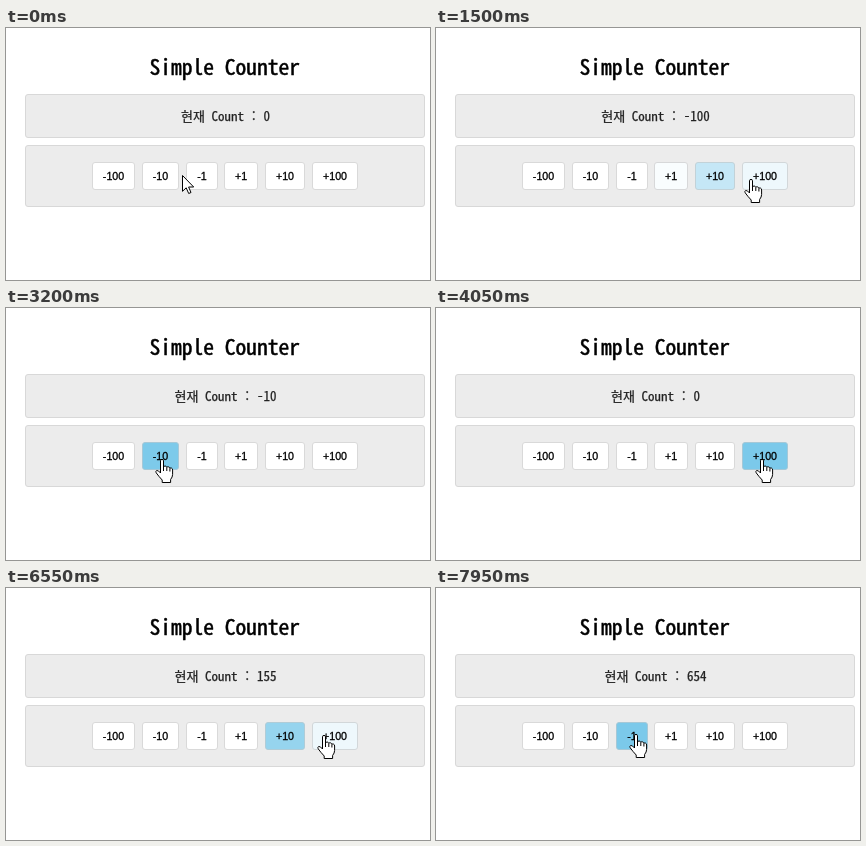
Write an HTML page that moves like this. It is 424x252 px and loops after 8 s.

```html
<!DOCTYPE html>
<html lang="ko">
<head>
<meta charset="utf-8">
<title>Simple Counter</title>
<style>
  html, body { margin: 0; width: 100%; height: 100%; overflow: hidden; background: #fff; }
  svg { display: block; }
  text { text-anchor: middle; white-space: pre; }
  .mono {
    font-family: "Noto Sans Mono CJK KR", "Noto Sans CJK KR", "Noto Sans Mono", monospace;
    font-variant-ligatures: none; font-feature-settings: "calt" 0;
  }
  .title { font-size: 21.5px; stroke: #000; stroke-width: .5px; }
  .count { font-size: 13px; fill: #222; stroke: #222; stroke-width: .25px; }
  .panel { fill: #ececec; stroke: #d8d8d8; }
  .button text { font: 10.67px "Liberation Sans", Arial, sans-serif; stroke: #000; stroke-width: .3px; }
  .cursor { fill: #fff; stroke: #000; stroke-linejoin: round; }
</style>
</head>
<body>
<svg width="424" height="252">
  <text class="mono title" x="218.8" y="47">Simple Counter</text>
  <rect class="panel" x="19.5" y="66.5" width="399" height="43" rx="2.5"/>
  <rect class="panel" x="19.5" y="117.5" width="399" height="61" rx="2.5"/>
  <text class="mono count" x="219.5" y="93"></text>
  <g id="buttons"></g>
  <path class="cursor" id="arrow" d="M.5 .5V16.3L4.2 12.8 6.7 18.5 9 17.5 6.6 12H11.7Z"/>
  <g class="cursor" id="hand">
    <path d="M-1.5 13V1.8Q-1.5 .4 0 .4T1.5 1.8V8Q2 6.9 3.2 7T4.8 8.4Q5.3 7.5 6.4 7.8T7.9 9.3Q8.4 8.7 9.5 9.1T10.6 11V15.5Q10.6 18 8.6 20.5V23.5H.2V21Q-3.2 17.5-5.8 13.8-6.6 12.2-5.4 11.5-3.8 11-1.5 14Z"/>
    <path fill="none" d="M1.5 7.5V12M4.8 8.4V12M7.9 9.3V12.5"/>
  </g>
</svg>
<script>
const LOOP = 8000, STEP = 50, FADE = 300, CLICK_GAP = 150;
const $ = s => document.querySelector(s);
const mix = (a, b, k) => a + (b - a) * k;
const blend = (a, b, k) => `rgb(${a.map((v, i) => mix(v, b[i], k))})`;

// Lay the buttons out in a row, each as wide as its label plus padding
const buttons = {};
let left = 86;
for (const label of ["-100", "-10", "-1", "+1", "+10", "+100"]) {
  const textWidth = (label[0] === "-" ? 3.55 : 6.23) + 5.93 * (label.length - 1);
  const x = Math.round(left), w = Math.round(left + 22 + textWidth) - x;
  buttons[label] = { x, w, visits: [] };
  left += textWidth + 28.7;
  $("#buttons").innerHTML += `<g class="button">
    <rect x="${x + .5}" y="134.5" width="${w - 1}" height="27" rx="2.5"/>
    <text x="${x + w / 2}" y="152">${label}</text></g>`;
}
const row = Object.values(buttons);
const faces = document.querySelectorAll(".button rect");

// Pointer stops: the clicks of a stop end as the pointer leaves
const stop = (label, arrive, leave, clicks = 1, dx = 20, y = 151) =>
  ({ label, arrive, leave, clicks, x: buttons[label].x + dx, y });
const stops = [
  { arrive: 0, leave: 0, clicks: 0, x: 176, y: 147 },
  stop("-100", 600, 875, 1, 29),
  stop("+100", 1600, 1800),
  stop("+100", 2020, 2020, 0),
  stop("+1", 2130, 2450, 1, 18, 150),
  stop("-1", 2650, 2800),
  stop("-10", 3050, 3200),
  stop("+10", 3450, 3600),
  stop("+100", 3850, 4250),
  stop("+1", 4700, 5400, 5),
  stop("+10", 5850, 6450, 5),
  stop("+100", 6550, 7450, 5, 12, 147),
  stop("-1", 7700, 7900, 1, 20, 146)
];

function pointer(t) {
  const i = stops.findLastIndex(s => s.arrive <= t);
  const a = stops[i], b = stops[i + 1] || a;
  if (t <= a.leave || a === b) return [a.x, a.y];
  const u = (t - a.leave) / (b.arrive - a.leave), k = u * u * (3 - 2 * u);
  return [mix(a.x, b.x, k), mix(a.y, b.y, k)];
}

function countAt(t) {
  let sum = 0;
  for (const s of stops)
    for (let i = 0; i < s.clicks; i++)
      if (s.leave - i * CLICK_GAP <= t) sum += Number(s.label);
  return sum;
}

const over = (b, x) => x >= b.x && x < b.x + b.w;

// The CSS "ease" curve, cubic-bezier(.25, .1, .25, 1)
function ease(x) {
  if (x <= 0) return 0;
  if (x >= 1) return 1;
  const bez = (a, b, s) => 3 * a * s * (1 - s) ** 2 + 3 * b * s * s * (1 - s) + s ** 3;
  let lo = 0, hi = 1;
  for (let i = 0; i < 20; i++) {
    const mid = (lo + hi) / 2;
    if (bez(.25, .25, mid) < x) lo = mid; else hi = mid;
  }
  return bez(.1, 1, lo);
}

// Find when the pointer enters and leaves each button
for (const b of row) {
  let visit = null;
  for (let t = 0; t < LOOP; t += 2) {
    const inside = over(b, pointer(t)[0]);
    if (inside && !visit) b.visits.push(visit = [t, LOOP]);
    if (!inside && visit) { visit[1] = t; visit = null; }
  }
}

const glow = (b, t) => Math.max(0, ...b.visits.map(([enter, leave]) =>
  ease((Math.min(t, leave) - enter) / FADE) * (1 - ease((t - leave) / FADE))));

function draw(now) {
  const t = Math.floor(now % LOOP / STEP) * STEP;
  const [x, y] = pointer(t).map(Math.round);
  $(".count").textContent = `현재 Count : ${countAt(t)}`;
  row.forEach((b, i) => {
    const k = glow(b, t);
    faces[i].style.fill = blend([255, 255, 255], [123, 201, 234], k);
    faces[i].style.stroke = blend([217, 217, 217], [165, 200, 215], k);
  });
  const hovering = row.some(b => over(b, x));
  for (const [id, on] of [["#hand", hovering], ["#arrow", !hovering]]) {
    $(id).style.display = on ? "" : "none";
    $(id).setAttribute("transform", `translate(${x} ${y})`);
  }
}

const start = performance.now();
function tick() {
  draw(performance.now() - start);
  requestAnimationFrame(tick);
}
tick();
</script>
</body>
</html>
```
